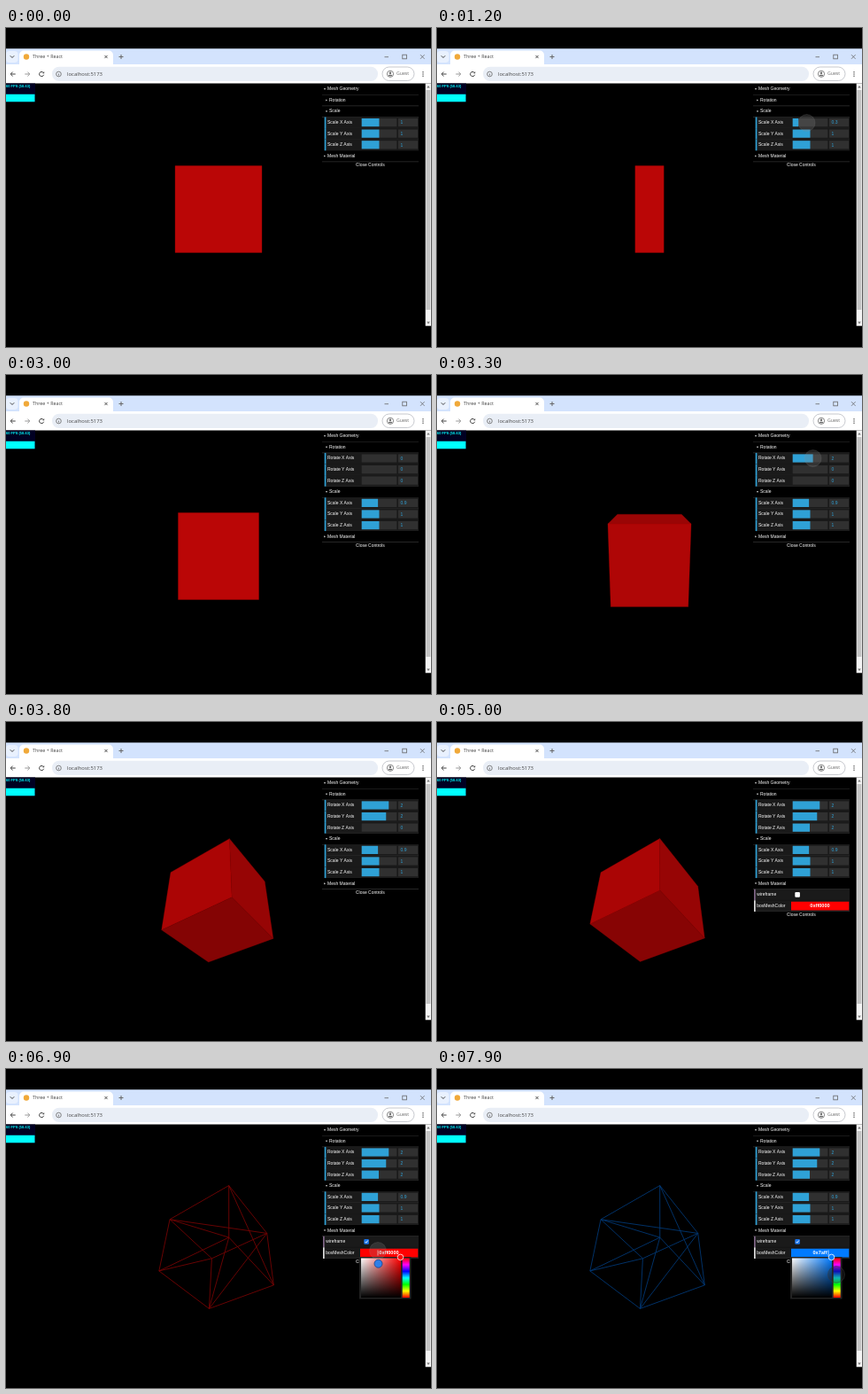
Recreate the animation shown at these times as an HTML page with a canvas. Size 480x360 px, loop 8000 ms.

```html
<!DOCTYPE html>
<html lang="en">
<head>
<meta charset="utf-8">
<style>
  html, body { margin: 0; width: 100%; height: 100%; overflow: hidden; background: #000; }
  canvas { display: block; width: 480px; height: 360px; }
</style>
</head>
<body>
<canvas width="480" height="360"></canvas>
<script>
const ctx = document.querySelector('canvas').getContext('2d');
const LOOP = 8000, STEP = 100;
const GUI_FONT = '"Liberation Sans", Arial, sans-serif';
const UI_FONT = '"Open Sans", sans-serif';
const BLUE = '#2fa1d6';

// [time, value] keys, linear between them
const SCALE_X = [[200, 1], [1200, .33], [1300, .65], [1500, .82], [1600, .82], [2300, .93]];
const ROTATE_X = [[3000, 0], [3400, 2.425]];
const ROTATE_Y = [[3500, 0], [3800, 2.187]];
const ROTATE_Z = [[3900, 0], [4100, 1.45], [4900, 1.45], [5000, 1.53]];

function track(keys, t) {
  if (t <= keys[0][0]) return keys[0][1];
  for (let i = 1; i < keys.length; i++) {
    const [t0, v0] = keys[i - 1], [t1, v1] = keys[i];
    if (t <= t1) return v0 + (v1 - v0) * (t - t0) / (t1 - t0);
  }
  return keys[keys.length - 1][1];
}

// ---------- drawing helpers ----------
function rect(x, y, w, h, color, radius = 0) {
  ctx.fillStyle = color;
  ctx.beginPath();
  ctx.roundRect(x, y, w, h, radius);
  ctx.fill();
}

function circle(x, y, r, fill, stroke, width = .8) {
  ctx.beginPath();
  ctx.arc(x, y, r, 0, 7);
  if (fill) { ctx.fillStyle = fill; ctx.fill(); }
  if (stroke) { ctx.strokeStyle = stroke; ctx.lineWidth = width; ctx.stroke(); }
}

function path(points, { fill, stroke, width = 1 }) {
  ctx.beginPath();
  points.forEach(([x, y]) => ctx.lineTo(x, y));
  if (fill) { ctx.closePath(); ctx.fillStyle = fill; ctx.fill(); }
  if (stroke) { ctx.strokeStyle = stroke; ctx.lineWidth = width; ctx.stroke(); }
}

const line = (x0, y0, x1, y1, stroke, width) => path([[x0, y0], [x1, y1]], { stroke, width });

function text(str, x, y, color, font, align = 'left') {
  ctx.font = font;
  ctx.fillStyle = color;
  ctx.textAlign = align;
  ctx.textBaseline = 'middle';
  ctx.fillText(str, x, y);
}

function cross(x, y, r, color, width) {
  line(x - r, y - r, x + r, y + r, color, width);
  line(x - r, y + r, x + r, y - r, color, width);
}

function gradient(x0, y0, x1, y1, colors) {
  const g = ctx.createLinearGradient(x0, y0, x1, y1);
  colors.forEach((c, i) => g.addColorStop(i / (colors.length - 1), c));
  return g;
}

// ---------- browser window ----------
function drawBrowser() {
  const ink = '#444', soft = '#666';
  rect(0, 23.2, 480, 18.8, '#d3e3fd');
  rect(0, 26, 13.5, 13, '#e9f1fe', 4);
  path([[4.8, 31.3], [7, 33.5], [9.2, 31.3]], { stroke: ink });
  rect(15, 25.5, 106, 17, '#fff', [5, 5, 0, 0]);
  circle(23, 32.5, 3.2, '#f0a93a');
  text('Three + React', 30, 32.7, ink, '5.35px ' + UI_FONT);
  cross(113, 32.5, 1.6, ink, .9);
  line(127.5, 32.5, 132.5, 32.5, soft);
  line(130, 30, 130, 35, soft);
  line(427.5, 32.7, 432, 32.7, soft, .8);
  ctx.strokeRect(447.8, 30.2, 4.6, 4.6);
  cross(470.3, 32.5, 2.3, soft, .8);

  rect(0, 41, 480, 21.5, '#fff');
  for (const [x, dir, color] of [[8, -1, ink], [24, 1, '#999']]) {
    line(x - 2.7, 52, x + 2.7, 52, color);
    path([[x + dir * .4, 49.6], [x + dir * 2.8, 52], [x + dir * .4, 54.4]], { stroke: color });
  }
  ctx.strokeStyle = ink;
  ctx.beginPath();
  ctx.arc(40.2, 52, 2.6, .3, 5.4);
  ctx.stroke();
  path([[41, 51.2], [43.2, 51.2], [43.2, 49]], { fill: ink });
  rect(52, 43.7, 368, 16.3, '#e9eef6', 8);
  circle(59.5, 52, 2.8, null, soft);
  line(59.5, 51.5, 59.5, 53.6, soft, .8);
  text('localhost:5173', 69, 52, ink, '5.93px ' + UI_FONT);
  rect(425, 44, 36, 15.5, '#fff', 7.7);
  ctx.strokeStyle = '#b9bcc2';
  ctx.lineWidth = .8;
  ctx.stroke();
  circle(434, 51.8, 3.6, null, soft);
  circle(434, 50.8, 1.2, soft);
  rect(432, 52.7, 4, 1.6, soft, 1);
  text('Guest', 441, 52, soft, '5.2px ' + UI_FONT);
  for (const y of [49.7, 52, 54.3]) circle(471, y, .7, ink);

  rect(473.7, 62.5, 6.3, 273.8, '#f4f4f4');
  rect(474.4, 70, 5, 248, '#c4c4c4');
  path([[475.2, 67.5], [478.8, 67.5], [477, 65]], { fill: '#777' });
  path([[475.2, 331.5], [478.8, 331.5], [477, 334]], { fill: '#777' });
}

function drawStats() {
  rect(0, 62.5, 33, 21, '#000022');
  text('60 FPS (58-63)', 0, 65.8, '#0ff', 'bold 4px ' + GUI_FONT);
  rect(0, 74.7, 32.5, 8.6, '#0ff');
}

// ---------- box mesh ----------
const CENTER = [240, 204.5], FOCAL = 328, DISTANCE = 3.85;
const DIAGONALS = [[5, 3], [0, 6], [6, 3], [0, 5], [4, 7], [1, 2]];

function rotate([x, y, z], [a, b, c]) {
  const { sin, cos } = Math;
  [x, y] = [x * cos(c) - y * sin(c), x * sin(c) + y * cos(c)];
  [x, z] = [x * cos(b) + z * sin(b), z * cos(b) - x * sin(b)];
  [y, z] = [y * cos(a) - z * sin(a), y * sin(a) + z * cos(a)];
  return [x, y, z];
}

function project([x, y, z]) {
  const k = FOCAL / (DISTANCE - z);
  return [CENTER[0] + x * k, CENTER[1] - y * k];
}

// Corner index bits 1, 2 and 4 mark the positive x, y and z sides.
function drawBox(scaleX, angles, wireframe, rgb) {
  const tint = k => `rgb(${rgb.map(v => Math.round(v * k))})`;
  const corners = Array.from({ length: 8 }, (_, i) => rotate(
    [i & 1 ? scaleX / 2 : -scaleX / 2, i & 2 ? .5 : -.5, i & 4 ? .5 : -.5], angles));
  const points = corners.map(project);

  if (wireframe) {
    const edges = [...DIAGONALS];
    for (let i = 0; i < 8; i++)
      for (const bit of [1, 2, 4]) if (!(i & bit)) edges.push([i, i | bit]);
    for (const [i, j] of edges) line(...points[i], ...points[j], tint(.45), .9);
    return;
  }
  for (let axis = 0; axis < 3; axis++) {
    const bit = 1 << axis, u = 1 << (axis + 1) % 3, v = 1 << (axis + 2) % 3;
    for (const side of [0, bit]) {
      const normal = rotate([0, 1, 2].map(i => i === axis ? (side ? 1 : -1) : 0), angles);
      const p = corners[side];
      const facing = normal[2] * DISTANCE - normal.reduce((s, n, i) => s + n * p[i], 0);
      if (facing <= 0) continue;
      const color = tint(.396 + .13 * normal[1] + .334 * normal[2]);
      path([side, side | u, side | u | v, side | v].map(i => points[i]),
        { fill: color, stroke: color, width: .3 });
    }
  }
}

// ---------- control panel ----------
const label = (str, x, y) => text(str, x, y, '#fff', '5px ' + GUI_FONT);

function folder(title, x, y, open) {
  const m = x - 3;
  path(open ? [[m - 1.1, y - .7], [m + 1.1, y - .7], [m, y + .8]]
            : [[m - .7, y - 1.1], [m + .8, y], [m - .7, y + 1.1]], { fill: '#fff' });
  label(title, x, y);
  rect(357, y + 6, 109, .7, '#333');
}

function row(title, x, y, accent) {
  rect(x, y - 6.2, 466 - x, 12, '#1a1a1a');
  rect(x, y + 5.8, 466 - x, .6, '#2c2c2c');
  rect(x, y - 6.2, 1.7, 12.6, accent);
  label(title, x + 3.3, y);
}

function slider(title, y, value, max, digits) {
  row(title, 359.7, y, BLUE);
  rect(401.7, y - 4.7, 39.6, 9.2, '#303030');
  rect(401.7, y - 4.7, 39.6 * value / max, 9.2, BLUE);
  rect(443, y - 4.7, 22, 9.2, '#303030');
  text(String(+value.toFixed(digits)), 445.5, y + .3, BLUE, '5px ' + GUI_FONT);
}

function drawPicker(color) {
  rect(399, 212, 58.5, 47.5, '#222');
  rect(401, 213.5, 45, 44.5, gradient(401, 0, 446, 0, ['#fff', color]));
  rect(401, 213.5, 45, 44.5, gradient(0, 213.5, 0, 258, ['rgba(0,0,0,0)', '#000']));
  rect(447.7, 213.5, 8, 44.5, gradient(0, 213.5, 0, 258,
    ['#f00', '#f0f', '#00f', '#0ff', '#0f0', '#ff0', '#f00']));
  circle(445.5, 212.4, 3.3, color, '#fff');
}

function drawPanel(s) {
  let y = 68.9;
  const next = () => (y += 12.6);
  folder('Mesh Geometry', 363, y, true);
  folder('Rotation', 365, next(), s.rotationOpen);
  if (s.rotationOpen)
    ['X', 'Y', 'Z'].forEach((axis, i) => slider(`Rotate ${axis} Axis`, next(), s.angles[i], Math.PI, 0));
  folder('Scale', 365, next(), true);
  ['X', 'Y', 'Z'].forEach((axis, i) => slider(`Scale ${axis} Axis`, next(), i ? 1 : s.scaleX, 2, 1));
  folder('Mesh Material', 363, next(), s.materialOpen);
  if (s.materialOpen) {
    row('wireframe', 358, next(), '#806787');
    rect(404.3, y - 2.8, 5.6, 5.6, s.wireframe ? '#1a73e8' : '#fff', 1);
    if (s.wireframe)
      path([[405.5, y], [406.7, y + 1.3], [408.8, y - 1.4]], { stroke: '#fff', width: .9 });
    row('boxMeshColor', 358, next(), '#ddd');
    rect(400, y - 4.7, 65.3, 9.6, s.color);
    text(s.blue ? '0x7aff' : '0xff0000', 432.5, y + .3, '#fff', 'bold 5.6px ' + GUI_FONT, 'center');
    if (s.picker) {
      const caret = s.blue ? 442 : 420;
      line(caret, y - 3, caret, y + 3, '#fff', .7);
    }
  }
  text('Close Controls', 411.3, y + 10.4, '#fff', '5px ' + GUI_FONT, 'center');
  if (s.picker) drawPicker(s.color);
}

function drawPointer(t, s) {
  const halo = (x, y) => circle(x, y, 9.5, 'rgba(130,130,130,.25)', 'rgba(150,150,150,.2)');
  const during = (from, to) => t >= from && t < to;
  const sliderEnd = (value, max) => 401.7 + 39.6 * value / max;
  if (during(300, 2400)) halo(sliderEnd(track(SCALE_X, t + 100), 2) + 3, 107);
  else if (during(2500, 2800)) halo(381, 81);
  else if (during(3100, 3500)) halo(sliderEnd(s.angles[0], Math.PI), 94);
  else if (during(3600, 3800)) halo(sliderEnd(s.angles[1], Math.PI), 106);
  else if (during(4000, 5000)) halo(sliderEnd(s.angles[2], Math.PI), 119);
  else if (during(5700, 5800)) halo(407, 194);
  else if (during(6900, 7200)) halo(420, 205);
  if (during(6900, 7600)) circle(420.5, 219.7, 4.5, '#2f7fe8', '#1b3f86');
  if (t >= 7600) circle(451, 232, 9.5, 'rgba(40,40,40,.35)', 'rgba(60,60,60,.6)');
}

function render(t) {
  const blue = t >= 7900;
  const state = {
    scaleX: track(SCALE_X, t),
    angles: [ROTATE_X, ROTATE_Y, ROTATE_Z].map(keys => track(keys, t)),
    rotationOpen: t >= 2500,
    materialOpen: t >= 5000,
    wireframe: t >= 5700,
    picker: t >= 6000,
    blue,
    color: blue ? '#007aff' : '#ff0000',
  };
  rect(0, 0, 480, 360, '#000');
  drawBrowser();
  drawStats();
  drawBox(state.scaleX, state.angles, state.wireframe, blue ? [0, 122, 255] : [255, 8, 8]);
  drawPanel(state);
  drawPointer(t, state);
}

function frame() {
  render(Math.floor(performance.now() % LOOP / STEP) * STEP);
  requestAnimationFrame(frame);
}
frame();
</script>
</body>
</html>
```
